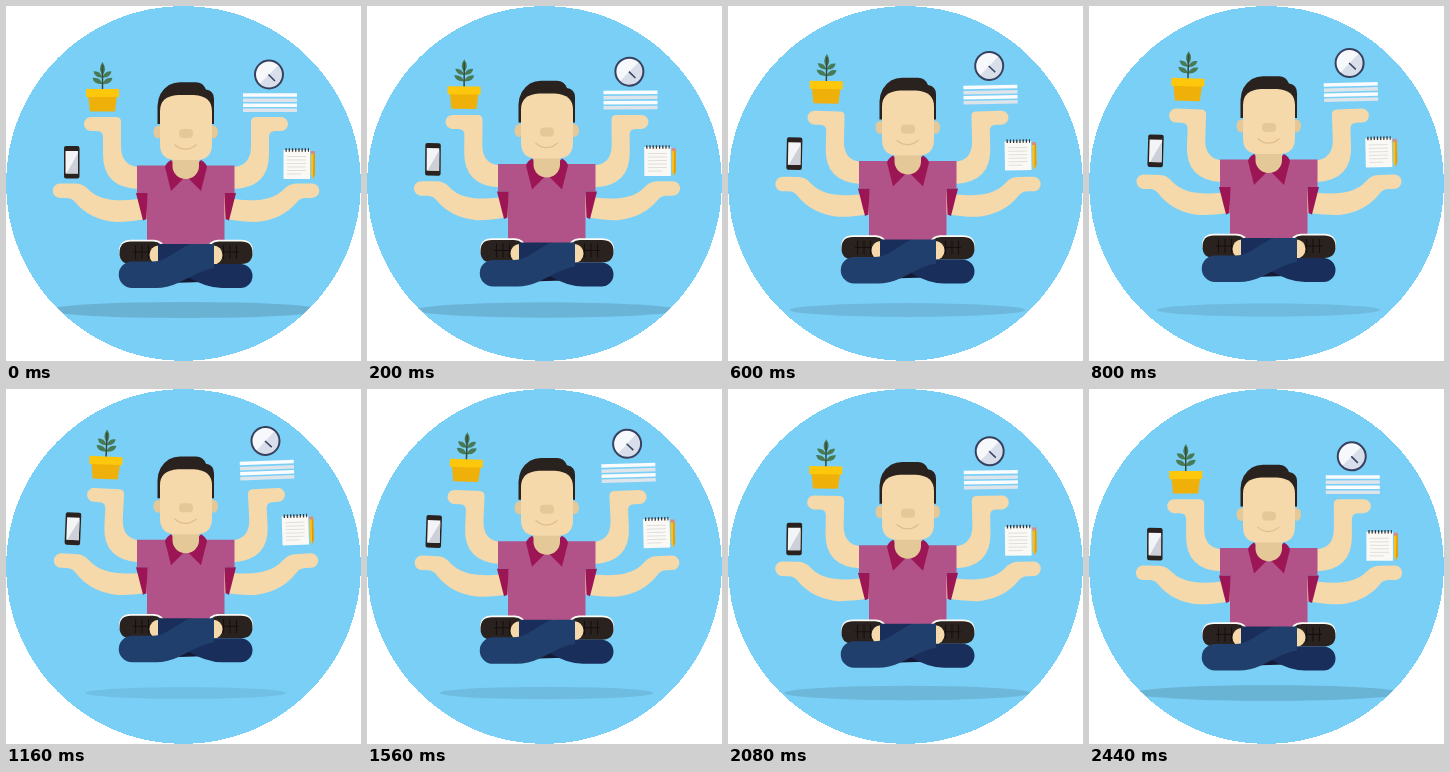
Recreate the animation shown at these times as an HTML page. Size 355 px wide and 355 px high, loop 2.52 s.

```html
<!DOCTYPE html>
<html lang="en">
<head>
<meta charset="utf-8">
<title>Floating multitasker</title>
<style>
  html, body { margin: 0; width: 100%; height: 100%; overflow: hidden; background: #fff; }
  svg { display: block; width: 100vw; height: 100vh; }
  .skin { fill: #f5d9aa; }
  .shade { fill: #e5c898; }
  .dark { fill: #2a221f; }
  .wine { fill: #9c1655; }
</style>
</head>
<body>
<svg viewBox="0 0 355 355">
  <defs>
    <clipPath id="disc"><circle cx="177.5" cy="177.5" r="177.5"/></clipPath>
  </defs>

  <circle cx="177.5" cy="177.5" r="177.5" fill="#7acff7" shape-rendering="crispEdges"/>
  <g clip-path="url(#disc)"><ellipse id="shadow" cx="179.5" cy="304" rx="137" ry="8"/></g>

  <g id="body">
    <g id="arms" class="skin">
      <path id="upperArm" d="M85 111H110Q115 111 115 116V140Q115 160 133 161H145V183H133Q97 182 97 148V131Q97 125 91 125H85A7 7 0 0 1 85 111Z"/>
      <path id="lowerArm" d="M54 177.500H70Q77 177.500 83 184Q97 198 132 193L145 190V212Q125 216 110 216Q84 214 69 196Q66 192 60 192H54A7.250 7.250 0 0 1 54 177.500Z"/>
    </g>
    <use href="#arms" transform="matrix(-1 0 0 1 360 0)"/>

    <path fill="#b15388" d="M131 159.500H228.500V187H218.500V242H141V187H131Z"/>
    <g id="sleeve" class="wine">
      <path d="M130 187H141.500L140.500 213L137 214.500Z"/>
      <path d="M165 154Q160 157 159 161L165 185L180 170Z"/>
    </g>
    <use href="#sleeve" transform="matrix(-1 0 0 1 360 0)"/>
    <path class="shade" d="M166.500 148H193V160A13.250 13 0 0 1 166.500 160Z"/>

    <g class="shade">
      <ellipse cx="152" cy="126" rx="4.500" ry="6.500"/>
      <ellipse cx="207.500" cy="126" rx="4.500" ry="6.500"/>
    </g>
    <path class="dark" d="M151.500 118V100Q152 86 163 79Q168 76.300 174 76.300H190Q197 76.300 200 83.500Q208 84.500 208 93V118Z"/>
    <path class="skin" d="M154 118V105Q154 90 172 89H188Q206 90 206 105V138Q206 154 190 154H170Q154 154 154 138Z"/>
    <rect class="shade" x="173" y="123" width="14" height="9" rx="4"/>
    <path d="M168.500 138.500Q179.500 148 190.500 138.500" fill="none" stroke="#e0bd8b" stroke-width="1.200"/>

    <g id="shoe">
      <path fill="#fdfbf6" d="M113 248V246Q113 233.800 125 233.800H148Q157 234 159 243V248Z"/>
      <path class="dark" d="M125 235.500H147Q157 236 158 246V258H125Q113.500 258 113.500 246.800Q113.500 235.500 125 235.500Z"/>
      <path d="M129.500 239V253M136 239V253M142.500 239V253M127 246H145" stroke="#15100f" stroke-width="1.100"/>
      <ellipse class="skin" cx="152.500" cy="249" rx="9" ry="9.500"/>
    </g>
    <use href="#shoe" transform="matrix(-1 0 0 1 360 0)"/>
    <path fill="#141a33" d="M164 277L180 264L197 276Z"/>
    <path fill="#1a2e5c" d="M152 238H185L208 258H234.500A12 12 0 0 1 234.500 282H216Q200 282 180 270L152 256Z"/>
    <path fill="#213f6c" d="M126 255.500H146Q154 255.500 162 251L178 241Q182 238 187 238H208V262Q201 263 192 267L172 277Q161 282 150 282H126A13.250 13.250 0 0 1 126 255.500Z"/>
  </g>

  <g id="plant">
    <g fill="#477a55">
      <path d="M96.500 56Q101.500 63 96.500 69Q91.500 63 96.500 56Z"/>
      <g id="leaves">
        <path d="M96.500 71.500Q89 72 87.500 65.500Q94 64.500 96.500 71.500Z"/>
        <path d="M96.500 78Q88 78.500 86.500 72Q94 71 96.500 78Z"/>
      </g>
      <use href="#leaves" transform="matrix(-1 0 0 1 193 0)"/>
    </g>
    <path d="M96.500 59V84" stroke="#38493a" stroke-width="1.500"/>
    <path fill="#f0b00a" d="M82 89H111L109 105.500H84Z"/>
    <rect x="80" y="83" width="33" height="8" fill="#fdc70c"/>
  </g>

  <g id="phone">
    <rect class="dark" x="58" y="140" width="15.500" height="32.500" rx="2"/>
    <path fill="#f3f4f6" d="M59.500 145H72V167.500H59.500Z"/>
    <path fill="#cdd0d8" d="M72 147V167.500H60.500Z"/>
  </g>

  <g id="clock">
    <circle cx="263" cy="68.500" r="14" fill="#f6f8fb"/>
    <path fill="#d9dfea" d="M272.900 58.600A14 14 0 0 1 253.100 78.400Z"/>
    <circle cx="263" cy="68.500" r="14" fill="none" stroke="#37415f" stroke-width="2"/>
    <path d="M262.500 68.500L269 75" stroke="#37415f" stroke-width="1.500"/>
  </g>

  <g id="papers" stroke-width="3.500">
    <path d="M237 89H291M237 99.300H291" stroke="#fbfcfd"/>
    <path d="M237 94.200H291M237 104.300H291" stroke="#dde5ea"/>
  </g>

  <g id="notebook">
    <rect x="277.500" y="144" width="26.500" height="29" fill="#faf9f5"/>
    <path d="M279.500 144H303" stroke="#3a3432" stroke-width="3.500" stroke-dasharray="1.300 1.900"/>
    <path d="M281 150.500H300M281 154H300M281 157.500H300M281 161H300M281 164.500H300M281 168H295" stroke="#dcdcda" stroke-width=".9"/>
    <path fill="#fbc01a" d="M305 147H309V168L307 173L305 168Z"/>
    <path fill="#e09a12" d="M307.500 147H309V168L307 173Z"/>
    <path fill="#d98b80" d="M305 145H309V148H305Z"/>
  </g>
</svg>
<script>
  const LOOP = 2520, LIFT = 9.5, ARM_TURN = 3.3;
  const get = id => document.getElementById(id);
  const move = (id, value) => get(id).setAttribute("transform", value);

  // id, pivot x, pivot y, travel x, travel y, turn in degrees
  const items = [
    ["plant", 96.5, 94, 3.4, -16.8, 2.5],
    ["phone", 65.7, 156, 1.3, -18, 2.5],
    ["clock", 263, 68.5, -3.8, -18, -2.5],
    ["papers", 264, 97, -3.2, -16.8, -2.3],
    ["notebook", 291, 158, -1.5, -18.5, -2]
  ];

  function draw(now) {
    const rise = 1 - Math.abs(1 - (now % LOOP) / (LOOP / 2));
    move("body", `translate(0 ${-LIFT * rise})`);
    move("upperArm", `rotate(${ARM_TURN * rise} 150 173)`);
    move("lowerArm", `rotate(${ARM_TURN * rise} 138 203)`);
    for (const [id, x, y, dx, dy, turn] of items) {
      move(id, `translate(${dx * rise} ${dy * rise}) rotate(${turn * rise} ${x} ${y})`);
    }
    const size = 1 - 0.29 * rise;
    const shadow = get("shadow");
    shadow.setAttribute("rx", 137 * size);
    shadow.setAttribute("ry", 8 * size);
    shadow.setAttribute("opacity", 0.14 - 0.065 * rise);
  }

  const start = performance.now();
  function tick() {
    draw(performance.now() - start);
    requestAnimationFrame(tick);
  }
  tick();
</script>
</body>
</html>
```
